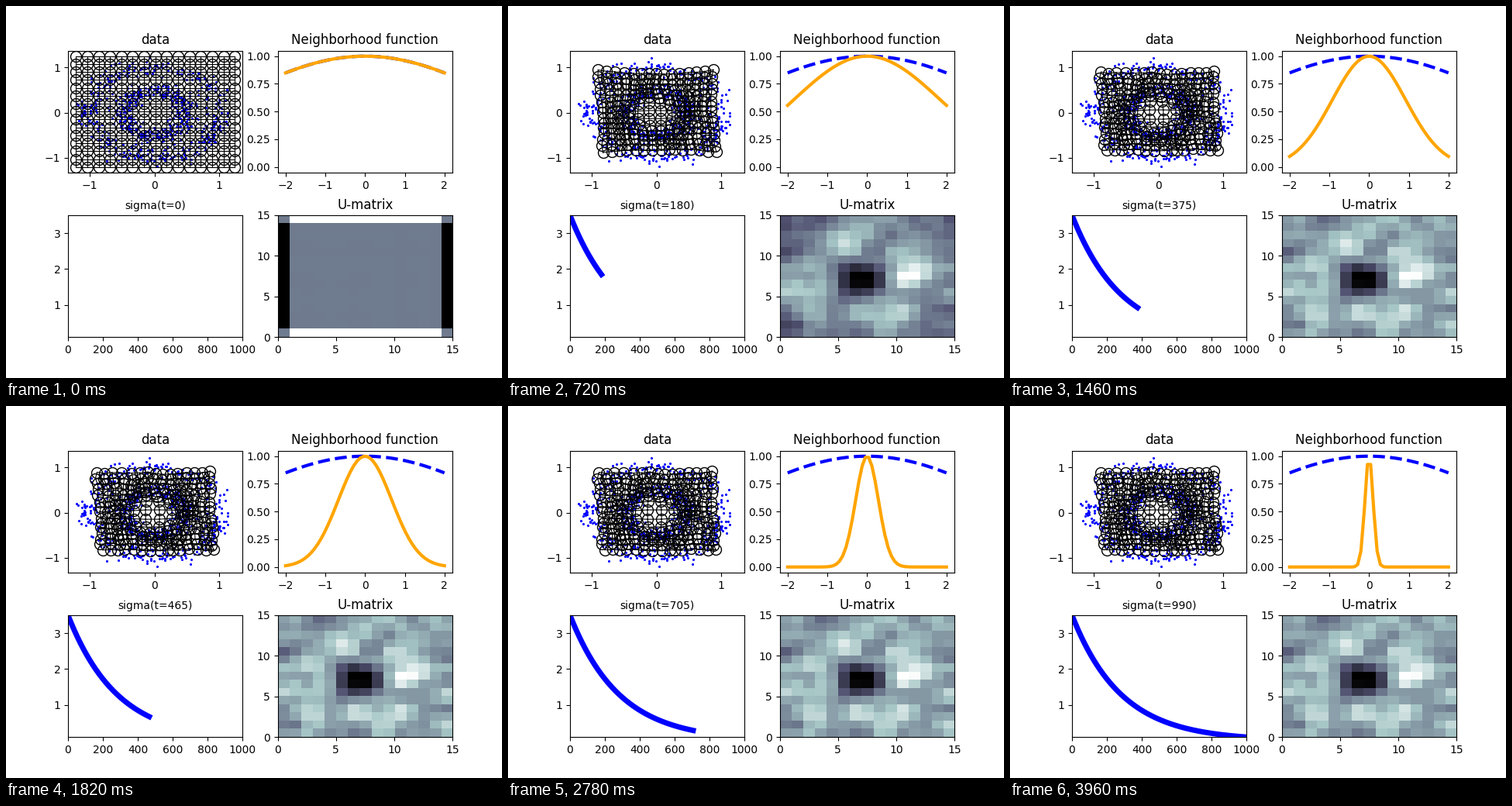
Recreate the animation shown at these times as a matplotlib script. Size 640 by 480 pixels, loop 4.06 s.

```python
import numpy as np
import matplotlib.pyplot as plt
from matplotlib.animation import FuncAnimation

N = 15                 # neurons per side
STEPS = 1000           # training steps
STRIDE = 15            # training steps per picture
LAST = 66              # index of the last picture
TICK = 20              # ms
TICKS = 203
SAMPLES = 700
SIGMA0, SIGMA1 = 3.5, 0.1

rng = np.random.default_rng(4)


def sigma(t):
    return SIGMA0 * (SIGMA1 / SIGMA0) ** (t / STEPS)


def neighborhood(x, t):
    return np.exp(-x ** 2 / (2 * sigma(t) ** 2))


def ease(t, tau):
    return 1 - np.exp(-(t / tau) ** 2)


# Two noisy rings of samples
x_lo, x_hi, y_lo, y_hi = -1.216, 1.242, -1.207, 1.2525
angle = rng.uniform(0, 2 * np.pi, SAMPLES)
radius = np.where(np.arange(SAMPLES) < SAMPLES // 2, 1.0, 0.5)
px = np.clip(radius * np.cos(angle) + rng.normal(0, 0.1, SAMPLES), x_lo, x_hi)
py = np.clip(radius * np.sin(angle) + rng.normal(0, 0.1, SAMPLES), y_lo, y_hi)

# Lattice coordinates, first index along x
u, v = np.meshgrid(np.linspace(-1, 1, N), np.linspace(-1, 1, N), indexing="ij")
start_x = x_lo + (u + 1) / 2 * (x_hi - x_lo)
start_y = y_lo + (v + 1) / 2 * (y_hi - y_lo)


def bump(cu, cv, width):
    """Local scaling field: offsets from a centre, fading with distance."""
    du, dv = u - cu, v - cv
    fade = np.exp(-(du ** 2 + dv ** 2) / width ** 2)
    return np.array([du * fade, dv * fade])


def jitter(spread):
    a = rng.normal(0, spread, (2, N, N))
    a = a + np.roll(a, 1, axis=1)
    return (a + np.roll(a, 1, axis=2)) / 2


hole = bump(-0.07, -0.07, 0.38)
dense = bump(0.5, -0.03, 0.3)
early = (bump(-0.8, -0.25, 0.45) + bump(-0.25, 0.65, 0.45)
         + bump(0.3, -0.55, 0.45) + bump(0.6, 0.2, 0.5))
corner = np.exp(-((u + 1) ** 2 + (v - 1) ** 2) / 0.15)
noise = jitter(0.021) * (1 - np.exp(-((u + 0.07) ** 2 + (v + 0.07) ** 2) / 0.16))
settle_x = 30 + 32 * (u * v) ** 2
settle_y = 30 + 60 * (u * v) ** 2


def lattice(t):
    """Neuron positions after t training steps."""
    late = ease(t, 200)
    warp = (0.62 * ease(t, 190) * hole - 0.22 * dense
            - 0.2 * (1 - 0.7 * late) * early + late * noise)
    goal_x = 0.02 + 0.86 * u - 0.025 * v - 0.02 * corner + warp[0]
    goal_y = 0.02 + 0.86 * v + 0.01 * u + 0.04 * corner + warp[1]
    return (goal_x + np.exp(-t / settle_x) * (start_x - goal_x),
            goal_y + np.exp(-t / settle_y) * (start_y - goal_y))


def u_matrix(x, y):
    """Mean distance of each neuron to its direct neighbours."""
    total, count = np.zeros((N, N)), np.zeros((N, N))
    along = np.hypot(np.diff(x, axis=0), np.diff(y, axis=0))
    across = np.hypot(np.diff(x, axis=1), np.diff(y, axis=1))
    for part, d in ((np.s_[1:], along), (np.s_[:-1], along),
                    (np.s_[:, 1:], across), (np.s_[:, :-1], across)):
        total[part] += d
        count[part] += 1
    return total / count


def mesh_path(x, y):
    """All rows and columns as one line with gaps."""
    def chain(a):
        gap = np.full((N, 1), np.nan)
        return np.hstack([np.hstack([m, gap]).ravel() for m in (a, a.T)])
    return chain(x), chain(y)


fig, axes = plt.subplots(2, 2, figsize=(6.4, 4.8), dpi=100)
fig.subplots_adjust(left=0.125, right=0.9, bottom=0.11, top=0.88,
                    wspace=0.2, hspace=0.35)
(ax_data, ax_hood), (ax_sigma, ax_u) = axes


def setup(ax, title, xlim, ylim, xticks, yticks, size=12):
    ax.set(xlim=xlim, ylim=ylim, xticks=xticks, yticks=yticks)
    return ax.set_title(title, fontsize=size)


def padded(lo, hi):
    pad = 0.05 * (hi - lo)
    return lo - pad, hi + pad


setup(ax_data, "data", padded(x_lo, x_hi), padded(y_lo, y_hi),
      [-1, 0, 1], [-1, 0, 1])
setup(ax_hood, "Neighborhood function", (-2.2, 2.2), (-0.05, 1.05),
      range(-2, 3), np.linspace(0, 1, 5))
sigma_title = setup(ax_sigma, "sigma(t=0)", (0, STEPS), (SIGMA1, SIGMA0),
                    range(0, 1001, 200), [1, 2, 3], size=10)
setup(ax_u, "U-matrix", (0, N), (0, N), range(0, 16, 5), range(0, 16, 5))

ax_data.plot(px, py, "b.", ms=2.5)
mesh, = ax_data.plot([], [], "k-", lw=0.8)
nodes, = ax_data.plot([], [], "o", ms=10, mfc="none", mec="black", mew=1)

hood_x = np.linspace(-2, 2, 50)
ax_hood.plot(hood_x, neighborhood(hood_x, 0), "--", color="blue", lw=3)
hood, = ax_hood.plot([], [], color="orange", lw=3)

decay, = ax_sigma.plot([], [], color="blue", lw=5)
cells = ax_u.imshow(np.zeros((N, N)), cmap="bone_r", origin="lower",
                    extent=(0, N, 0, N), aspect="auto",
                    interpolation="nearest")


def update(k):
    # Pictures stay for 20 ms and 100 ms in turn
    t = STRIDE * min(2 * (k // 6) + (k % 6 > 0), LAST)
    x, y = lattice(t)
    mesh.set_data(*mesh_path(x, y))
    nodes.set_data(x.ravel(), y.ravel())
    hood.set_data(hood_x, neighborhood(hood_x, t))
    past = np.arange(t + 1)
    decay.set_data(past, sigma(past))
    sigma_title.set_text(f"sigma(t={t})")
    dist = u_matrix(x, y)
    cells.set_data(dist.T)
    cells.set_clim(dist.min(), dist.max())
    return mesh, nodes, hood, decay, sigma_title, cells


anim = FuncAnimation(fig, update, frames=TICKS, interval=TICK, repeat=True,
                     cache_frame_data=False)
plt.show()
```
